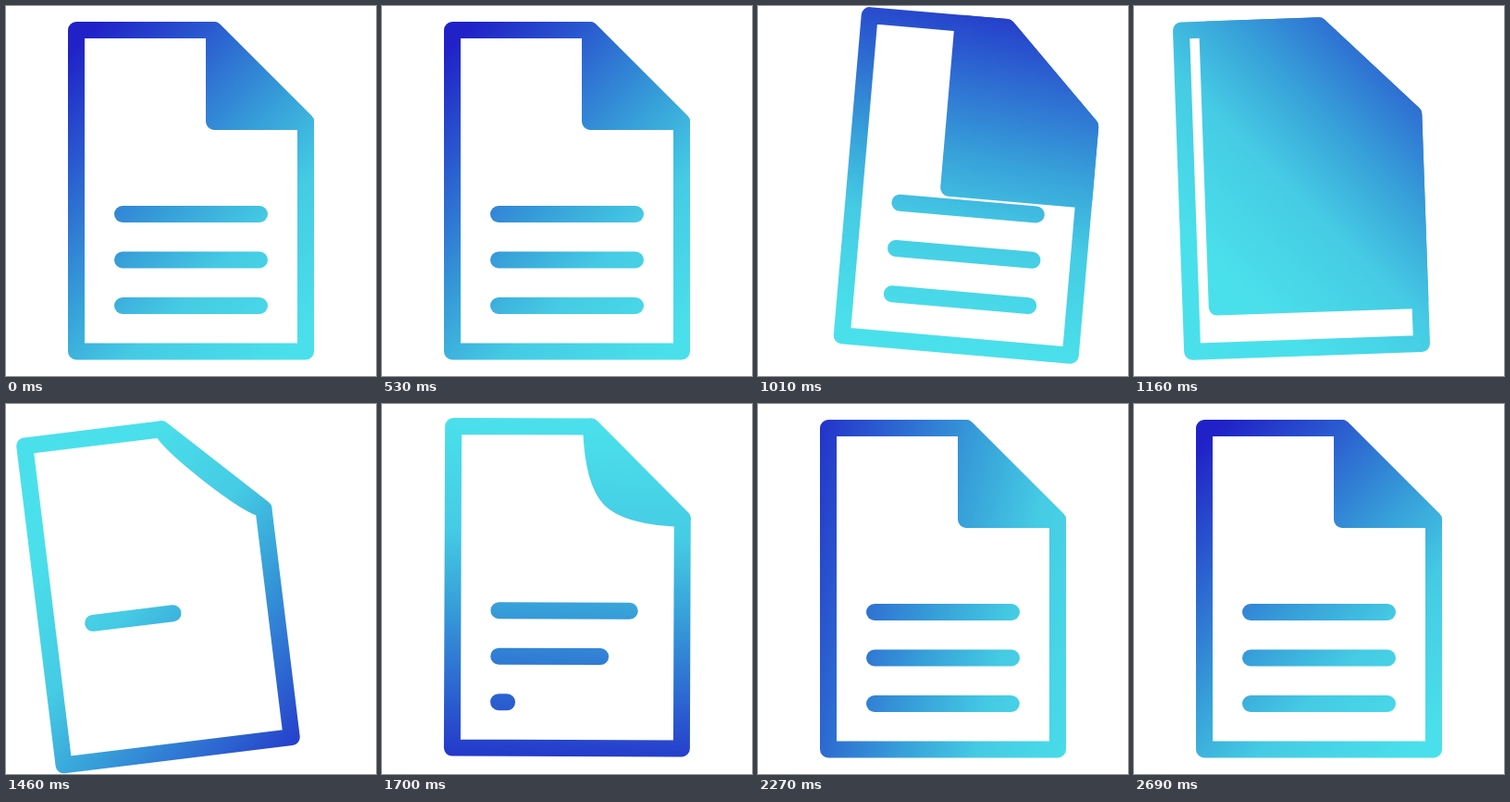
These frames come from a looping animation (400 by 400 pixels, 2930 ms). An HTML page with a canvas:

```html
<!DOCTYPE html>
<html lang="en">
<head>
<meta charset="utf-8">
<title>Document</title>
<style>
  html, body { margin: 0; width: 100%; height: 100%; overflow: hidden; background: #fff; }
  canvas { display: block; width: 100vw; height: 100vh; }
</style>
</head>
<body>
<canvas id="stage" width="400" height="400"></canvas>
<script>
const ctx = document.getElementById('stage').getContext('2d');
const LOOP = 2930, START = 530, END = 2540, STEP = 30;
const LEFT = 76, RIGHT = 324, TOP = 26, BOTTOM = 373.5;
const CUT_X = 225, CUT_Y = 125, WEIGHT = 18;

// Page pose: time, x offset, y offset, degrees
const pose = [
  [530, 0, 0, 0], [740, 48, -1.5, 7.6], [820, 55, -2, 9], [1040, 23, -6, 4],
  [1160, -19, -4, -2], [1340, -38, 1, -7.4], [1460, -35.5, 3, -7],
  [1580, -19, 1.7, -4.3], [1700, .5, -1.5, .2], [1910, 15, -7, 5],
  [2060, 9, -5, 3.1], [2120, 5, -4, 1.65], [2250, 0, 0, 0]
];
// Gradient: time, direction of the dark end, shift towards it
const light = [
  [530, -135, 0], [740, -123, 0], [1160, -45, 62], [1460, 42, 45],
  [1700, 93, 22], [2060, 155, 0], [2540, 225, 0]
];
const cover = [[770, 0], [1000, .3], [1160, .81], [1240, 1]];
const sweep = [[1200, 0], [1300, .5], [1400, 1]];
const fold = [[1390, 0], [1460, .1], [1700, .58], [2060, .97], [2200, 1]];

const mix = (a, b, p) => a + (b - a) * p;

// Smooth interpolation through the keys without overshoot
function track(keys, t, col = 1) {
  const last = keys.length - 1;
  if (t <= keys[0][0]) return keys[0][col];
  if (t >= keys[last][0]) return keys[last][col];
  const i = keys.findIndex(k => k[0] > t) - 1;
  const secant = n => (keys[n + 1][col] - keys[n][col]) / (keys[n + 1][0] - keys[n][0]);
  const slope = n => {
    if (n === 0 || n === last) return 0;
    const a = secant(n - 1), b = secant(n);
    return a * b <= 0 ? 0 : 2 * a * b / (a + b);
  };
  const span = keys[i + 1][0] - keys[i][0], u = (t - keys[i][0]) / span;
  const ease = u * u * (3 - 2 * u);
  return mix(keys[i][col], keys[i + 1][col], ease)
    + span * u * (1 - u) * (slope(i) * (1 - u) - slope(i + 1) * u);
}

function trace(points, closed = true) {
  ctx.beginPath();
  points.forEach(([x, y]) => ctx.lineTo(x, y));
  if (closed) ctx.closePath();
}

function solid() {
  ctx.fill();
  ctx.stroke();
}

function drawCover(t) {
  const p = track(cover, t), gone = track(sweep, t);
  const x = mix(CUT_X, LEFT, p), y = mix(CUT_Y, BOTTOM, p);
  ctx.save();
  if (gone > 0) {
    const c = mix(CUT_X - TOP + WEIGHT, LEFT - BOTTOM - WEIGHT, gone);
    trace([[c - 200, -200], [c + 700, 700], [-800, 700], [-800, -200]]);
    ctx.clip();
  }
  trace([[x, TOP], [x, y], [RIGHT, y], [RIGHT, CUT_Y], [CUT_X, TOP]]);
  solid();
  ctx.restore();
}

function drawFold(t) {
  const p = track(fold, t), d = 45 * (1 - p);
  const x = mix((CUT_X + RIGHT) / 2, CUT_X, p), y = mix((TOP + CUT_Y) / 2, CUT_Y, p);
  ctx.beginPath();
  ctx.moveTo(CUT_X, TOP);
  ctx.quadraticCurveTo(x - d, y - d, x, y);
  ctx.quadraticCurveTo(x + d, y + d, RIGHT, CUT_Y);
  ctx.closePath();
  solid();
}

function lineLength(t, row) {
  if (t < 1230) return 1;
  const u = (t - 1330 - 180 * row) / 800;
  return u <= 0 ? 0 : 1 - Math.max(0, 1 - u) ** 5;
}

function drawLines(t) {
  [225, 274.5, 324].forEach((y, row) => {
    const length = lineLength(t, row);
    if (!length) return;
    trace([[126, y], [mix(126, 274, length), y]], false);
    ctx.stroke();
  });
}

function paint(t) {
  const angle = track(light, t) * Math.PI / 180, shift = track(light, t, 2);
  const dx = Math.cos(angle), dy = Math.sin(angle);
  const at = d => [200 + dx * d, 200 + dy * d];
  const ramp = ctx.createLinearGradient(...at(shift + 200), ...at(shift - 200));
  ramp.addColorStop(0, '#2021c7');
  ramp.addColorStop(.5, '#37a0d9');
  ramp.addColorStop(.7, '#45cbe4');
  ramp.addColorStop(1, '#4ae0eb');
  ctx.globalCompositeOperation = 'source-in';
  ctx.fillStyle = ramp;
  ctx.fillRect(0, 0, 400, 400);
}

function draw(t) {
  ctx.reset();
  ctx.lineWidth = WEIGHT;
  ctx.lineCap = ctx.lineJoin = 'round';
  ctx.save();
  ctx.translate(200 + track(pose, t), 200 + track(pose, t, 2));
  ctx.rotate(track(pose, t, 3) * Math.PI / 180);
  ctx.translate(-200, -200);
  trace([[LEFT, TOP], [CUT_X, TOP], [RIGHT, CUT_Y], [RIGHT, BOTTOM], [LEFT, BOTTOM]]);
  ctx.stroke();
  drawLines(t);
  if (t < 1400) drawCover(t);
  if (t >= 1390) drawFold(t);
  ctx.restore();
  paint(t);
}

function tick() {
  const t = performance.now() % LOOP;
  const stepped = START + Math.floor((t - START) / STEP) * STEP;
  draw(Math.min(END, Math.max(0, stepped)));
  requestAnimationFrame(tick);
}
tick();
</script>
</body>
</html>
```
